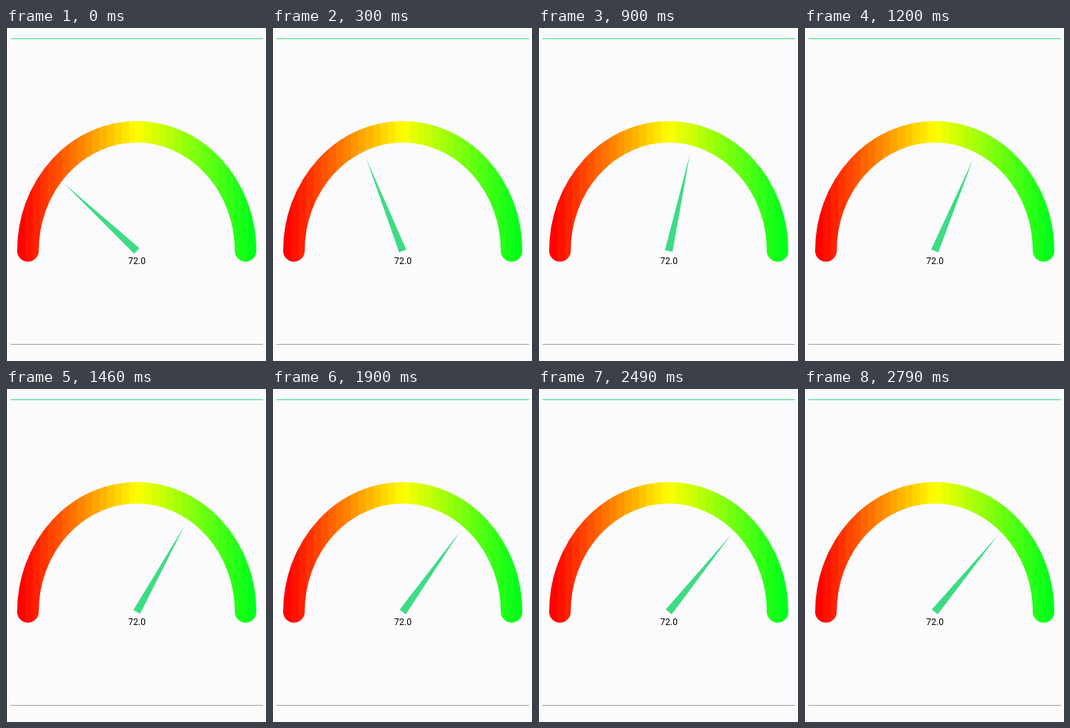
Animation, 350 px wide and 450 px high, one loop 3390 ms. Source, as an HTML page with a canvas:

```html
<!DOCTYPE html>
<html lang="en">
<head>
<meta charset="utf-8">
<title>Gauge</title>
<style>
  html, body { margin: 0; width: 100%; height: 100%; overflow: hidden; }
  canvas { display: block; }
</style>
</head>
<body>
<canvas id="stage" width="350" height="450"></canvas>
<script>
const ctx = document.getElementById('stage').getContext('2d');
const LOOP = 3390;
const STEPS = [0, 150, 300, 450, 600, 750, 900, 1050, 1200, 1320, 1460, 1610,
  1750, 1900, 2050, 2200, 2350, 2490, 2640, 2790];
const CX = 176, CY = 301.3;
const GREEN = '#3ddc84';

// Red to yellow to green, in vertical bands of 10 px.
function bandedGradient() {
  const left = 6, right = 346, band = 10;
  const gradient = ctx.createLinearGradient(left, 0, right, 0);
  for (let x = left; x < right; x += band) {
    const mix = Math.min(1, Math.max(0, (x + band / 2 - 20) / 312));
    const r = Math.round(255 * Math.min(1, 2 - 2 * mix));
    const g = Math.round(255 * Math.min(1, 2 * mix));
    const b = Math.round(26 * Math.max(0, 2 * mix - 1));
    const color = `rgb(${r},${g},${b})`;
    gradient.addColorStop((x - left) / (right - left), color);
    gradient.addColorStop((x + band - left) / (right - left), color);
  }
  return gradient;
}
const arcColors = bandedGradient();

function rect(color, x, y, w, h) {
  ctx.fillStyle = color;
  ctx.fillRect(x, y, w, h);
}

function drawArc() {
  ctx.beginPath();
  ctx.ellipse(CX, CY, 146.5, 161, 0, Math.PI, 2 * Math.PI);
  ctx.lineWidth = 29;
  ctx.lineCap = 'round';
  ctx.strokeStyle = arcColors;
  ctx.stroke();
}

function drawNeedle(degrees) {
  ctx.save();
  ctx.translate(CX, CY);
  ctx.rotate(degrees * Math.PI / 180);
  ctx.beginPath();
  ctx.moveTo(-5.2, 0);
  ctx.lineTo(0, -133.5);
  ctx.lineTo(5.2, 0);
  ctx.fillStyle = GREEN;
  ctx.fill();
  ctx.restore();
}

// The needle slows down towards its final angle.
function needleAngle(time) {
  return 39.6 - 86.6 * (1 - time / 3590) ** 4;
}

function draw(now) {
  const time = now % LOOP;
  const step = STEPS.filter(s => s <= time).pop();
  rect('#fbfbfe', 0, 0, 350, 450);
  rect('#000', 0, 0, 1, 450);
  rect(GREEN, 6, 14, 340, 1);
  rect('#a0a0a0', 6, 427, 340, 1);
  drawArc();
  drawNeedle(needleAngle(step));
  ctx.fillStyle = '#000';
  ctx.font = '12px Roboto, sans-serif';
  ctx.textAlign = 'center';
  ctx.fillText('72.0', CX + 0.3, 319);
  requestAnimationFrame(() => draw(performance.now() - start));
}

const start = performance.now();
draw(0);
</script>
</body>
</html>
```
